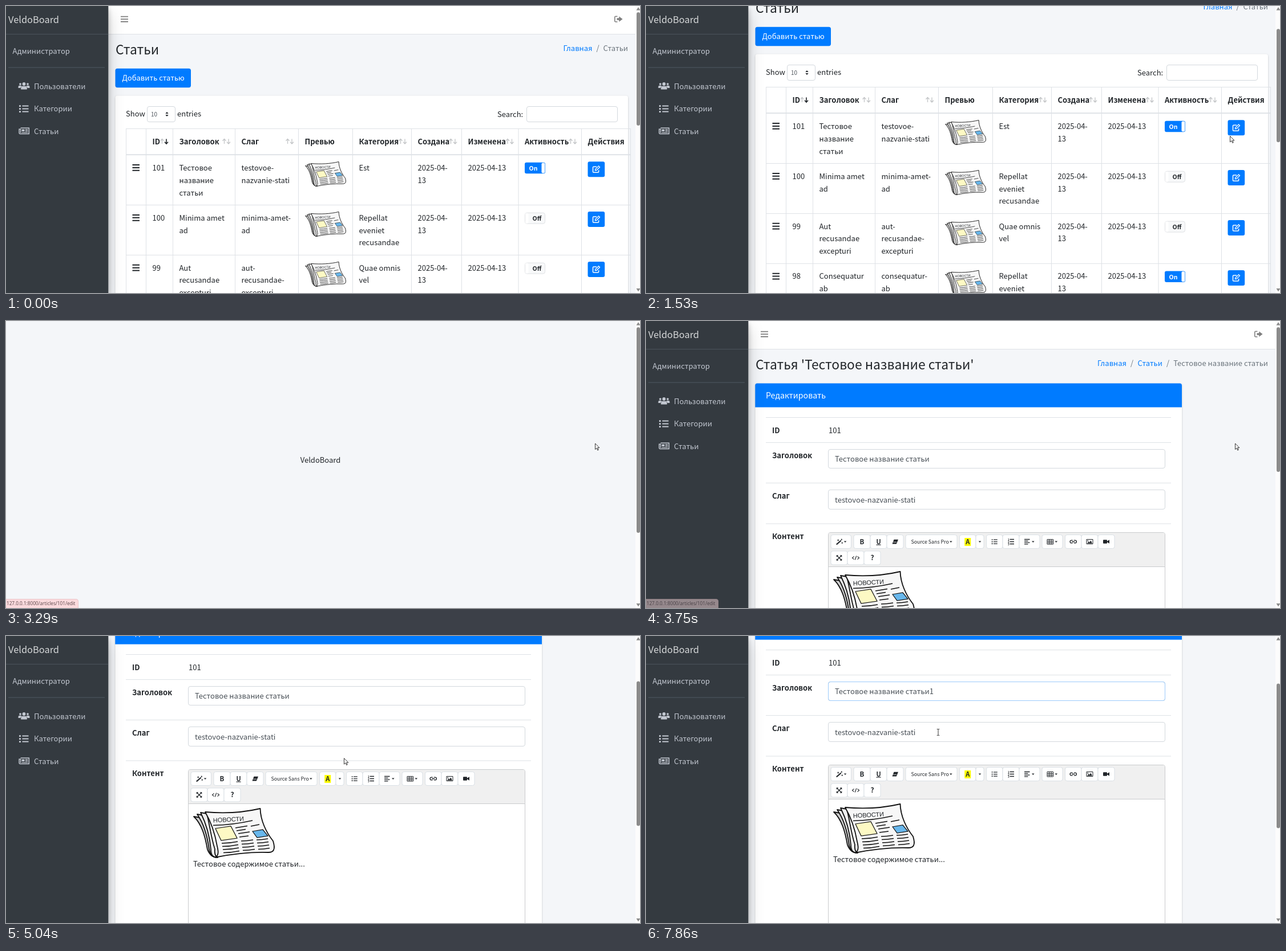
Write an HTML page that moves like this. It is 1111x504 px and loops after 8000 ms.

```html
<!DOCTYPE html>
<html lang="ru">
<head>
<meta charset="utf-8">
<title>VeldoBoard</title>
<style>
  html, body { margin: 0; width: 100%; height: 100%; overflow: hidden; background: #f4f6f9; }
  svg { display: block; width: 1111px; height: 504px; }
  text { font: 13.03px 'Noto Sans CJK SC', 'Noto Sans CJK JP', 'Noto Sans CJK', 'Noto Sans', sans-serif; fill: #212529; white-space: pre; }
  .b { font-weight: 700; }
  .h1 { font-size: 22.8px; }
  .link { fill: #007bff; }
  .mute { fill: #6c757d; }
  .field { fill: #495057; }
  .side { fill: #c2c7d0; }
  .white { fill: #fff; }
  .news { font: 11px 'Liberation Sans', Arial, sans-serif; }
  .status { font: 8.2px 'Open Sans', 'Noto Sans', sans-serif; fill: #5b474a; }
  .raised { filter: drop-shadow(0 4.6px 4.6px rgba(0,0,0,.22)) drop-shadow(0 13px 12.8px rgba(0,0,0,.2)); }
</style>
</head>
<body>
<script>
const BRAND = 'VeldoBoard', ARTICLE = 'Тестовое название статьи';
const BLUE = '#007bff', INK = '#212529', LINE = '#dee2e6';

// Markup helpers
const text = (x, y, str, cls = '', extra = '') => `<text x="${x}" y="${y}" class="${cls}" ${extra}>${str}</text>`;
const sized = (x, y, str, size, cls = '', css = '') => text(x, y, str, cls, `style="font-size:${size}px;${css}"`);
const rect = (x, y, w, h, fill, extra = '') => `<rect x="${x}" y="${y}" width="${w}" height="${h}" fill="${fill}" ${extra}/>`;
const box = (x, y, w, h, stroke = '#d3d8dd', fill = '#fff', extra = '') => rect(x, y, w, h, fill, `stroke="${stroke}" rx="3.5" ${extra}`);
const fillPath = (d, fill = INK, extra = '') => `<path d="${d}" fill="${fill}" ${extra}/>`;
const stroke = (d, color = INK, width = 1, extra = '') => `<path d="${d}" fill="none" stroke="${color}" stroke-width="${width}" ${extra}/>`;
const at = (x, y, body, extra = '') => `<g transform="translate(${x} ${y})" ${extra}>${body}</g>`;
const bars = (x, y, w, gap, color, thick = 1.9) => stroke([0, 1, 2].map(i => `M${x} ${y + i * gap}h${w}`).join(''), color, thick);
const caretDown = (x, y) => fillPath(`M${x} ${y}h4.6l-2.3 2.6z`);

const editIcon = stroke('M7.5 2.2H2.3Q1 2.2 1 3.5V11Q1 12.3 2.3 12.3H9.8Q11.1 12.3 11.1 11V8.3', '#fff', 1.5)
  + stroke('M5 8.8l.4-2.3L11 .9l2 2L7.4 8.5z', '#fff', 1.3);
const listIcon = (c, w = 16, gap = 5) => bars(w * .33, 1.5, w * .67, gap, c, w / 8)
  + bars(0, 1.5, w * .18, gap, c, w / 6);

function newspaper() {
  const ink = 'stroke="#111" stroke-width="1.8" stroke-linejoin="round"';
  const sheets = [[1, 15], [7, 11], [13, 8]].map(([x, y], i) =>
    fillPath(`M${x} ${y}l11 2C${22 + i * 4} 35 ${28 + i * 2} 55 ${32 + i * 3} 72Q37 85 43 86.5Q31 88 ${25 + i * 3} 73C${21 + i * 4} 50 ${15 + i * 4} 28 ${x} ${y}z`, i ? '#eee' : '#ccc', ink)).join('');
  const front = fillPath('M21 7C55 10 88 8 117.5 1C118 22 128 43 140 58C145 74 140 78 132 78C100 77 72 80 40 86.5C45 82 44 75 42 67C38 44 31 24 21 7z', '#f7f7f7', ink);
  let lines = 'M35 30.5C60 30 82 27 104 22M74 35l21-3.5M76 40l16-2.5M79 45l20-3M81 51l16-2M101 32l15-3';
  for (let i = 0; i < 4; i++) {
    const y = 62 + i * 5.5;
    lines += `M${50 + i} ${y}q14 0 28-3M${84 + i} ${y - 4}q10 0 21-2M${111 + i} ${y - 6}q9 0 20-2`;
  }
  return sheets + front + stroke(lines, '#111', 1.5)
    + fillPath('M39 36l27-4 11 21-28 4z', '#fdf9c4', 'stroke="#111" stroke-width="1.2"')
    + fillPath('M104 41l18-3 9 11-19 3z', '#68b7ec', 'stroke="#111" stroke-width="1.2"')
    + text(35, 25.5, 'НОВОСТИ', 'news', 'transform="rotate(-3 35 25)"');
}

const navbar = rect(179, 0, 924, 49.5, '#fff') + rect(179, 49, 924, 1, LINE)
  + bars(201, 18.7, 13, 4.4, '#7f7f7f', 1.8)
  + at(1066, 17.5, stroke('M5.5 .8H2.2Q.8 .8 .8 2.2V8.8Q.8 10.2 2.2 10.2H5.5', '#7f7f7f', 1.6)
    + fillPath('M4.5 3.7H8.3V.8L14.5 5.5L8.3 10.2V7.3H4.5z', '#7f7f7f'));
const card = (w, y, h) => rect(191.5, y, w, h, '#fff', 'rx="3.7" style="filter:drop-shadow(0 1px 1.4px rgba(0,0,0,.2))"');

// Article list
const columns = [210.5, 245.5, 292.5, 401.5, 512.5, 607.5, 710.5, 798.5, 898, 1008.5, 1094.5];
const headings = ['', 'ID', 'Заголовок', 'Слаг', 'Превью', 'Категория', 'Создана', 'Изменена', 'Активность', 'Действия'];
const articles = [
  [101, 'Тестовое|название|статьи', 'testovoe-|nazvanie-stati', 'Est', true],
  [100, 'Minima amet|ad', 'minima-amet-|ad', 'Repellat|eveniet|recusandae', false],
  [99, 'Aut|recusandae|excepturi', 'aut-|recusandae-|excepturi', 'Quae omnis|vel', false],
  [98, 'Consequatur|ab', 'consequatur-|ab', 'Repellat|eveniet|recusandae', true],
];

function sortArrows(right, active) {
  const faint = '#c3c5c7';
  return stroke(`M${right - 19} 242V233.5m-3 3.3l3-3.3 3 3.3`, faint, 1.3)
    + stroke(`M${right - 11.5} 233.5V242m-3-3.3l3 3.3 3-3.3`, active ? INK : faint, active ? 1.6 : 1.3);
}

function toggle(on) {
  return on
    ? rect(0, 0, 36, 19.5, BLUE, 'rx="3"') + rect(29.5, .8, 5.8, 17.9, '#fff', 'rx="2"') + sized(15, 14, 'On', 10.6, 'b white', 'text-anchor:middle')
    : box(.5, .5, 35, 19, '#dfe1e4', '#f8f9fa') + rect(1, 1, 5.5, 18, '#fff', 'rx="2"') + sized(21.5, 14, 'Off', 10.6, 'b', 'text-anchor:middle');
}

function articleRow([id, title, slug, category, on], i) {
  const cell = (col, str) => String(str).split('|').map((s, j) => text(columns[col] + 11, 26.8 + j * 21.9, s)).join('');
  return at(0, 262 + i * 87.9, bars(221.5, 17, 12.5, 4.9, INK, 2)
    + cell(1, id) + cell(2, title) + cell(3, slug) + cell(5, category) + cell(6, '2025-04-|13') + cell(7, '2025-04-13')
    + at(524, 11, `<g transform="scale(.503)">${newspaper()}</g>`)
    + at(909, 12.8, toggle(on))
    + rect(1019.5, 11.2, 29.7, 27, BLUE, `rx="3" ${i ? '' : 'id="edit"'}`) + at(1027.5, 18, editIcon)
    + rect(210, 87, 885, 1, LINE));
}

const listPage = navbar + text(192, 84.5, 'Статьи', 'h1')
  + text(976.5, 78.5, 'Главная', 'link') + text(1034.5, 78.5, '/', 'mute') + text(1090, 78.5, 'Статьи', 'mute', 'text-anchor="end"')
  + rect(191.5, 109.7, 132.5, 33.5, BLUE, 'rx="3.7"') + text(203.5, 131, 'Добавить статью', 'white')
  + card(898.5, 157.5, 900)
  + text(210, 193.8, 'Show') + box(247.5, 176.5, 49, 27) + sized(254, 194, '10', 10, 'field')
  + fillPath('M279.3 189h5.4l-2.7-3zM279.3 191h5.4l-2.7 3z') + text(300, 193.8, 'entries')
  + text(861, 194.5, 'Search:') + box(912.5, 176.5, 159, 27)
  + rect(210, 215, 885, 1, LINE) + rect(210, 260.2, 885, 1.9, LINE)
  + columns.map(x => rect(x - .5, 215, 1, 700, LINE)).join('')
  + headings.map((h, i) => text(columns[i] + 11, 243.3, h, 'b')
    + ([0, 4, 9].includes(i) ? '' : sortArrows(columns[i + 1], i === 1))).join('')
  + articles.map(articleRow).join('');

// Edit form
const toolButton = (x, w, row, body) => box(x, 375.5 + row * 28.5, w, 24, '#dae0e5') + at(x + w / 2, 387.5 + row * 28.5, body);
const letter = (str, size, cls, css = '') => sized(0, size * .37, str, size, cls, 'text-anchor:middle;' + css);
const tableIcon = stroke('M-9-4H1.5V4.5H-9zM-9-1H1.5M-9 1.8H1.5M-5.5-4V4.5M-2-4V4.5');
const numbered = bars(-2, -4, 7.5, 4, INK, 1.3)
  + [1, 2, 3].map(n => sized(-5.5, -6 + n * 4, n, 4.5, 'b')).join('');
const toolbar = [
  [324, 35.5, 0, stroke('M-8 5L0-2', INK, 2.2) + stroke('M-5-4v3M-6.5-2.5h3M1-5v2.4M-.2-3.8h2.4M2 1v2.4M.8 2.2h2.4') + caretDown(5, -1)],
  [364, 29, 0, letter('B', 11.5, 'b')],
  [393, 29, 0, letter('U', 11, 'b', 'text-decoration:underline')],
  [422, 29, 0, fillPath('M-2-3.8H5.5L2.3 4H-5z') + stroke('M-3.4.8H2.5', '#fff', .8)],
  [455, 90, 0, sized(-35.5, 3.2, 'Source Sans Pro', 8.8) + caretDown(32, -1)],
  [549.5, 28.5, 0, rect(-5.5, -6.5, 11, 14, '#ff0') + letter('A', 11, 'b')],
  [578, 14, 0, caretDown(-2.3, -1)],
  [596.5, 28.5, 0, at(-5, -5, listIcon(INK, 10, 3.6))],
  [625, 29, 0, numbered],
  [654, 36, 0, stroke('M-9-4H.5M-9-1.2H-2.5M-9 1.6H.5M-9 4.4H-2.5', INK, 1.3) + caretDown(4, -1)],
  [694, 36, 0, tableIcon + caretDown(4.5, -1)],
  [734.5, 28.5, 0, stroke('M-1-2.4H-3.2a2.4 2.4 0 0 0 0 4.8H-1M1-2.4H3.2a2.4 2.4 0 0 1 0 4.8H1M-2.5 0h5', INK, 1.4)],
  [763, 29, 0, stroke('M-5.5-4h11v8h-11z') + fillPath('M-4.3 3l2.5-3.5 1.5 1.7L2-2l2.4 5z') + fillPath('M-4-2.5h1.6v1.6H-4z')],
  [792, 29, 0, rect(-5.5, -3.3, 7, 6.6, INK, 'rx="1"') + fillPath('M1.5-.8L5.5-3.2V3.2L1.5.8z')],
  [324, 29, 1, stroke('M-4-4l8 8M4-4l-8 8', INK, 1.2) + fillPath('M-4.8-4.8h3.6l-3.6 3.6zM4.8-4.8v3.6L1.2-4.8zM-4.8 4.8V1.2l3.6 3.6zM4.8 4.8H1.2l3.6-3.6z')],
  [353, 29, 1, stroke('M-3-2.6L-6 0l3 2.6M3-2.6L6 0 3 2.6M1.2-3.5l-2.4 7', INK, 1.1)],
  [382, 29, 1, letter('?', 12, 'b')],
].map(args => toolButton(...args)).join('');

const formPage = navbar + text(192, 84.5, `Статья '${ARTICLE}'`, 'h1')
  + text(791, 78.5, 'Главная', 'link') + text(849, 78.5, '/', 'mute') + text(861.5, 78.5, 'Статьи', 'link')
  + text(912, 78.5, '/', 'mute') + text(1090, 78.5, ARTICLE, 'mute', 'text-anchor="end"')
  + card(747.5, 109.7, 900) + fillPath('M191.3 151.5V113.2Q191.3 109.5 195 109.5H935.3Q939 109.5 939 113.2V151.5z', BLUE)
  + sized(210, 135.8, 'Редактировать', 14.2, 'white')
  + [169.5, 213.5, 284.5, 356].map(y => rect(210, y - .5, 710, 1, LINE)).join('')
  + [['ID', 196.6], ['Заголовок', 241], ['Слаг', 312], ['Контент', 383]].map(([s, y]) => text(221, y, s, 'b')).join('')
  + text(320, 196.6, '101')
  + box(319.5, 225.5, 590, 33) + box(319.5, 225.5, 590, 33, '#9ccbfb', 'none', 'id="focus"')
  + text(331, 247.4, ARTICLE, 'field', 'id="title"') + rect(0, 233, 1, 19, INK, 'id="caret"')
  + box(319.5, 296.5, 590, 34) + text(331, 318.6, 'testovoe-nazvanie-stati', 'field')
  + box(319.5, 371.5, 590, 500, '#c9cbcd') + rect(320, 372, 589, 59.5, '#f0f0f0', 'rx="3"') + rect(320, 431, 589, 1, '#c9cbcd')
  + toolbar + at(328, 439, newspaper()) + text(328, 542.4, 'Тестовое содержимое статьи...');

// Browser frame and sidebar
const usersIcon = [[3.5, 3.6, 1.9], [16.5, 3.6, 1.9], [10, 3.4, 2.9]].map(([x, y, r]) => `<circle cx="${x}" cy="${y}" r="${r}" fill="#c2c7d0"/>`).join('')
  + fillPath('M0 10.5V8.5Q0 6.3 2 6.3H4.5Q5.5 6.3 6 7 4.4 8 4 10.5zM20 10.5V8.5Q20 6.3 18 6.3H15.5Q14.5 6.3 14 7 15.6 8 16 10.5zM4.7 13V10.5Q4.7 7.3 7.7 7.3H12.3Q15.3 7.3 15.3 10.5V13z', '#c2c7d0');
const newsIcon = stroke('M3.3 .8H18V11H2.2Q.8 11 .8 9.6V2.8H3.3V9.5', '#c2c7d0', 1.5)
  + stroke('M5.5 4.5h4.5M11.5 3.5h4.5M11.5 6h4.5M5.5 8.6h10.5', '#c2c7d0', 1.4) + rect(5.5, 3, 4.5, 3.6, '#c2c7d0');
const sidebar = rect(0, 0, 179.3, 504, '#343a40', 'class="raised"')
  + sized(4, 29.6, BRAND, 16.4, '', 'font-weight:300;fill:#d6d8d9') + rect(0, 49, 179, 1, '#4b545c')
  + text(11.5, 83.6, 'Администратор', 'side') + rect(4, 107.5, 169, 1, '#4f5962')
  + at(21.5, 133.5, usersIcon) + at(23, 174, listIcon('#c2c7d0', 16.5)) + at(22.3, 213.5, newsIcon)
  + ['Пользователи', 'Категории', 'Статьи'].map((s, i) => text(49, 146 + i * 39.3, s, 'side')).join('');
const scrollbar = rect(1103, 0, 8, 504, '#fcfcfc') + rect(1105, 11, 6, 199, '#8b8b8b', 'rx="3" id="thumb"')
  + fillPath('M1104.5 7.5h7l-3.5-5.5zM1104.5 496h7l-3.5 5.5z', '#8b8b8b');
const status = box(-4, 488.5, 130.5, 20, '#ecc6ca', '#fbdadd') + text(1, 499.3, '127.0.0.1:8000/articles/101/edit', 'status');
const outlined = d => fillPath(d, '#fff', 'stroke="#222" stroke-width=".9" stroke-linejoin="round"');

document.body.innerHTML = `<svg viewBox="0 0 1111 504">
  <g id="list">${listPage}</g><g id="form">${formPage}</g>${sidebar}
  <g id="loader">${rect(0, 0, 1111, 504, '#f4f6f9', 'id="cover"')}${text(551, 249, BRAND, '', 'text-anchor="middle" id="loading"')}</g>
  ${scrollbar}<g id="status">${status}</g>
  <g id="pointer"><g id="arrow">${outlined('M0 0V10.5L2.5 8.2L4.2 12L5.8 11.3L4.1 7.6H7.4z')}</g>
  <g id="hand">${outlined('M-1 5.5V1Q0-.7 1 1V4.2L5.4 5Q6.8 5.4 6.5 7L5.5 11.5H.3L-3.3 7.2Q-3.2 5.6-1 7.5z')}</g>
  <g id="beam">${stroke('M-2.2-5.5H-.6L0-5L.6-5.5H2.2M-2.2 5.5H-.6L0 5L.6 5.5H2.2M0-5V5', '#333', 1)}</g></g>
</svg>`;

// Motion
const $ = id => document.getElementById(id);
const set = (id, name, value) => $(id).setAttribute(name, value);
const show = (id, on) => { $(id).style.display = on ? '' : 'none'; };
const ramp = (t, from, to) => Math.min(1, Math.max(0, (t - from) / (to - from)));
const easeOut = u => 1 - (1 - u) ** 3;

const pointerPath = [
  [260, 892, 470], [400, 985, 378], [470, 1032, 395], [1060, 1032, 395], [1530, 1023.5, 228.5],
  [1600, 1025, 226], [2000, 1032.5, 215], [4020, 1032.5, 215], [4190, 850, 193], [4370, 646, 222],
  [4570, 646, 222], [4770, 618.5, 222], [5040, 592.5, 215], [5320, 578, 118], [5720, 556, 98.3],
  [7390, 556, 98.3], [7860, 512, 169],
];

function pointerAt(t) {
  const i = pointerPath.findIndex(p => p[0] > t);
  if (i < 1) return pointerPath.at(i).slice(1);
  const [a, b] = [pointerPath[i - 1], pointerPath[i]], u = ramp(t, a[0], b[0]);
  return [1, 2].map(k => a[k] + (b[k] - a[k]) * u);
}

function draw(t) {
  const editing = t >= 3290;
  const scroll = Math.round(editing ? 145 * easeOut(ramp(t, 4790, 5200)) : 73 * easeOut(ramp(t, 810, 1080)));
  show('list', !editing);
  show('form', editing);
  set(editing ? 'form' : 'list', 'transform', `translate(0 ${-scroll})`);

  const cover = editing ? 504 * (1 - ramp(t, 3520, 3720)) : 0;
  show('loader', cover > 0);
  set('cover', 'height', cover);
  set('loading', 'y', cover / 2 - 3);
  show('loading', cover > 30);
  set('thumb', 'y', 11 + scroll * (editing ? .5 : .4));
  set('thumb', 'height', !editing ? 199 : t < 3520 ? 361 : 254);

  const hand = t >= 1670 && t < 3290;
  set('edit', 'fill', !hand ? BLUE : t >= 2600 && t < 2740 ? '#0062cc' : '#0069d9');
  set('status', 'opacity', ramp(t, 1680, 1860) * (1 - ramp(t, 3680, 3820)));

  const [x, y] = pointerAt(t);
  const overField = (top, h) => y + scroll > top && y + scroll < top + h;
  const beam = t >= 3820 && x > 319 && x < 910 && (overField(225.5, 33) || overField(296.5, 34));
  show('pointer', t >= 260);
  set('pointer', 'transform', `translate(${x} ${y})`);
  show('hand', hand);
  show('beam', beam);
  show('arrow', !hand && !beam);

  const typed = t >= 7190;
  const title = ARTICLE + (typed ? '1' : '');
  if ($('title').textContent !== title) $('title').textContent = title;
  set('focus', 'opacity', ramp(t, 5600, 5720));
  const blink = Math.floor((t - (typed ? 7190 : 5612)) / 526);
  show('caret', t >= 5612 && blink % 2 === 0);
  if (t >= 5612) set('caret', 'x', Math.round(331 + $('title').getComputedTextLength()));
}

const start = performance.now();
function tick() {
  draw((performance.now() - start) % 8000);
  requestAnimationFrame(tick);
}
tick();
</script>
</body>
</html>
```
